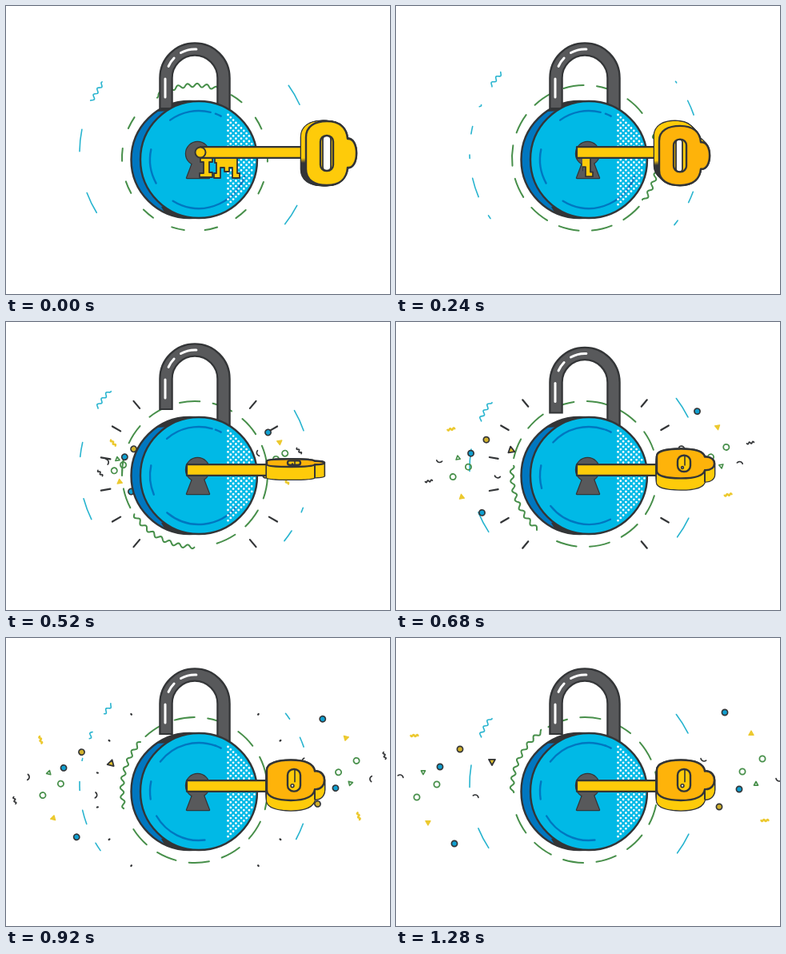
Animation of 480 by 360 pixels, one loop 1.32 s. Source, as an HTML page with a canvas:

```html
<!DOCTYPE html>
<html lang="en">
<head>
<meta charset="utf-8">
<title>Padlock and key</title>
<style>
html, body { margin: 0; width: 100%; height: 100%; overflow: hidden; background: #fff; }
canvas { display: block; width: 480px; height: 360px; }
</style>
</head>
<body>
<canvas id="stage"></canvas>
<script>
const LOOP = 1320, STEP = 40, RAD = Math.PI / 180;
const INK = '#333537', METAL = '#58595b', CYAN = '#00b9e6', BLUE = '#0077c0',
      GOLD = '#fecb0a', GREEN = '#478f4a', SEA = '#28b4cf', WHITE = '#fff';
const canvas = document.getElementById('stage');
const c = canvas.getContext('2d');
const dpr = window.devicePixelRatio || 1;
canvas.width = 480 * dpr;
canvas.height = 360 * dpr;

const ramp = (t, from, to) => Math.min(1, Math.max(0, (t - from) / (to - from)));
const smooth = x => x * x * (3 - 2 * x);
const easeOut = (x, n = 2) => 1 - (1 - x) ** n;

function stroke(color, width, cap = 'round') {
  c.strokeStyle = color;
  c.lineWidth = width;
  c.lineCap = cap;
  c.lineJoin = 'round';
  c.stroke();
}

function fill(color) {
  c.fillStyle = color;
  c.fill();
}

function line(x0, y0, x1, y1) {
  c.beginPath();
  c.moveTo(x0, y0);
  c.lineTo(x1, y1);
}

function arc(x, y, r, from = 0, to = 360) {
  c.beginPath();
  c.arc(x, y, r, from * RAD, to * RAD);
}

function pill(x, y, w, h, r) {
  c.beginPath();
  c.roundRect(x, y, w, h, r);
}

function poly(points) {
  c.beginPath();
  points.forEach(([x, y]) => c.lineTo(x, y));
  c.closePath();
}

function wavyArc(x, y, r, from, to, amp, period) {
  c.beginPath();
  for (let a = from; a <= to; a += 0.4) {
    const d = r + amp * Math.sin(a / period * 2 * Math.PI);
    c.lineTo(x + d * Math.cos(a * RAD), y + d * Math.sin(a * RAD));
  }
}

// Dashes that swing to and fro behind windows of angles.
function outerRing(t) {
  const swing = -3 + 10 * Math.cos((t - 320) / LOOP * 2 * Math.PI);
  const dashes = (from, to, start, draw) => {
    for (let k = -2; k <= 2; k++) {
      const a = start + swing + k * 21.5;
      const lo = Math.max(a, from), hi = Math.min(a + 11, to);
      if (hi - lo < 0.4) continue;
      draw(lo, hi);
      stroke(SEA, 1.6);
    }
  };
  const plain = (a, b) => arc(236, 183, 144, a, b);
  dashes(20, 39, 30, plain);
  dashes(145, 167, 151, plain);
  dashes(177, 193, 183, plain);
  dashes(322, 341, 327, plain);
  dashes(203.5, 224, 209, (a, b) => wavyArc(236, 183, 144, a, b, 2, 3.6));
}

function greenRing(t) {
  const a = 266 + 300 * easeOut(ramp(t, 60, 1280), 2.6);
  const dash = 10 + 6 * ramp(t, 0, 240);
  wavyArc(236, 190, 91, a - 28, a + 28, 2.2, 7.5);
  stroke(GREEN, 2);
  for (let i = 0; i < 11; i++) {
    const s = a + 34 + i * 26.4;
    arc(236, 190, 91, s, s + dash);
    stroke(GREEN, 2);
  }
}

function rays(t) {
  const x = ramp(t, 440, 920);
  if (x === 0 || t > 920) return;
  const r0 = 107 + 16 * x ** 2.4, r1 = 118 + 6 * x;
  for (let a = 10; a < 360; a += 20) {
    const dx = Math.cos(a * RAD), dy = Math.sin(a * RAD);
    if (dx > 0.9 || Math.abs(dx) < 0.6) continue;
    line(236 + r0 * dx, 190 + r0 * dy, 236 + r1 * dx, 190 + r1 * dy);
    stroke(INK, 2.2);
  }
}

function dot(color) {
  arc(0, 0, 3.6);
  fill(color);
  stroke(INK, 1.7);
}

function wave(color, width) {
  c.beginPath();
  for (let x = -4.5; x <= 4.5; x += 0.5) c.lineTo(x, 1.1 * Math.sin(x * 1.4));
  stroke(color, width);
}

function tri(size, edge, width, color) {
  poly([[-size, -size * 0.8], [size, -size * 0.8], [0, size]]);
  if (color) fill(color);
  stroke(edge, width);
}

const shapes = {
  cyan: () => dot('#109fd0'),
  gold: () => dot('#d0b02c'),
  ring() { arc(0, 0, 3.6); stroke(GREEN, 1.8); },
  flag: () => tri(4, INK, 1.8, '#e3c12b'),
  yellow: () => tri(3, '#ecc92f', 1.4, '#ecc92f'),
  green: () => tri(2.6, GREEN, 1.6),
  streak: () => wave('#ecc92f', 2.4),
  worm: () => wave(INK, 1.7),
  hook() { arc(0, 2, 4, 230, 350); stroke(INK, 1.7); }
};

// Resting places on the left; the right side is the same, half a turn round.
const CONFETTI = [
  ['streak', 23, 122], ['cyan', 55, 161], ['cyan', 73, 257], ['gold', 80, 139],
  ['flag', 120, 155], ['green', 34, 168], ['ring', 51, 183], ['ring', 26, 199],
  ['hook', 5, 173], ['hook', 99, 198], ['worm', -13, 206], ['yellow', 40, 231]
];

function confetti(t) {
  if (t < 200) return;
  const out = 0.773 * ramp(t, 150, 680) ** 1.5 + 0.227 * easeOut(ramp(t, 680, 1280), 1.6);
  for (const side of [0, Math.PI]) {
    c.save();
    c.translate(242, 175);
    c.rotate(side);
    for (const [shape, x, y] of CONFETTI) {
      c.save();
      c.translate(-17 + (x - 225) * out, (y - 175) * out);
      c.rotate((1 - out) * 750 * RAD);
      shapes[shape]();
      c.restore();
    }
    c.restore();
  }
}

function shackle(t) {
  const lift = 19 * smooth(ramp(t, 400, 520)) - 11 * smooth(ramp(t, 540, 860));
  const bow = end => {
    c.beginPath();
    c.moveTo(200, end);
    c.lineTo(200, 90);
    c.arc(236, 90, 36, Math.PI, 0);
    c.lineTo(272, 165);
  };
  c.save();
  c.translate(0, -lift);
  bow(129);
  stroke(INK, 17.5, 'butt');
  bow(127);
  stroke(METAL, 13, 'butt');
  line(199, 91, 199, 114);
  stroke(WHITE, 3);
  arc(236, 90, 36, 204, 224);
  stroke(WHITE, 3);
  arc(236, 90, 36, 241, 273);
  stroke(WHITE, 3);
  c.restore();
}

function backDisc() {
  arc(229.5, 192, 73);
  fill(BLUE);
  c.save();
  c.clip();
  poly([[194, 251], [260, 240], [260, 270], [205, 270]]);
  fill(INK);
  poly([[186, 132], [205, 116], [250, 116], [230, 130]]);
  fill(INK);
  c.restore();
  arc(229.5, 192, 73);
  stroke(INK, 2.4);
}

function frontDisc(t) {
  arc(241, 192, 73);
  fill(CYAN);

  const p = smooth(ramp(t, 300, 900));
  const groove = (a, b) => {
    arc(241, 192, 61, a, b);
    stroke(BLUE, 2.4);
  };
  groove(234 - 16 * p, 284 + 6 * p);
  groove(290, 297);
  groove(151 + 20 * p, 192);
  groove(20 + 63 * p, 122 + 28 * p);

  c.beginPath();
  for (let row = 0; row < 36; row++) {
    for (let x = 277.5 + (row % 2) * 3.3; x < 312; x += 6.6) {
      const y = 136 + row * 3.3;
      if (Math.hypot(x - 241, y - 192) > 70) continue;
      c.moveTo(x + 1.4, y);
      c.arc(x, y, 1.4, 0, 7);
    }
  }
  fill(WHITE);
  arc(241, 192, 73);
  stroke(INK, 2.4);
}

function keyhole() {
  const head = () => arc(239.5, 184.5, 14.5);
  const foot = () => poly([[234, 194], [226, 215], [254, 215], [246, 194]]);
  for (const part of [head, foot]) { part(); stroke(INK, 2.4); }
  for (const part of [head, foot]) { part(); fill(METAL); }
}

const TEETH = [
  new Path2D('M0 0H15V5H11V18H15V24H-1V19H4V5H0Z'),
  new Path2D('M18 0H46V19H49V25H40V12H36V17H30V12H25V25H17V19H20V6H18Z')
];

function teeth(tip, y, squash) {
  c.save();
  c.beginPath();
  c.rect(233, 150, 200, 100);
  c.clip();
  c.translate(tip, y);
  c.scale(1, squash);
  c.fillStyle = GOLD;
  c.strokeStyle = INK;
  c.lineWidth = 1.8;
  TEETH.forEach(p => {
    c.fill(p);
    c.stroke(p);
  });
  c.restore();
}

function headPath(x, y, w, e, s) {
  const far = w + (e - w) / 0.75;
  const curve = (...v) => c.bezierCurveTo(...v.map((n, i) => i % 2 ? y + n * s : x + n));
  c.beginPath();
  c.moveTo(x, y - 20 * s);
  curve(0, -34, w * 0.22, -40, w * 0.5, -40);
  curve(w * 0.84, -40, w * 0.98, -30, w, -18);
  curve(far, -20, far, 20, w, 18);
  curve(w * 0.98, 30, w * 0.84, 40, w * 0.5, 40);
  curve(w * 0.22, 40, 0, 34, 0, 20);
  c.closePath();
}

function drawKey(t) {
  // Slide in, wind back a little, turn past the stop, settle.
  const slide = smooth(ramp(t, 0, 240));
  const turn = smooth(ramp(t, 240, 520));
  const angle = (-22 * slide + 105 * turn - 32 * easeOut(ramp(t, 520, 920))) * RAD;
  const s = Math.cos(angle), dx = -6 * (1 - turn), dy = 16 * Math.sin(angle);
  const end = 372 - 46 * slide, tip = end - 129, left = Math.max(tip, 226);
  const x = end + 3 * (1 - turn), y = 184 - dy / 2;
  const w = 52 + 8 * turn, e = 63 + 9 * turn;
  const axis = 183 + 2 * turn;

  if (turn < 0.6) teeth(tip, axis + 7, s);
  c.beginPath();
  c.rect(left, axis - 6.8, end + 2 - left, 13.6);
  fill(GOLD);
  stroke(INK, 2.2);
  if (tip > 232) {
    arc(tip, axis, 6.5);
    fill(GOLD);
    stroke(INK, 2);
  }

  // Extruded side, lit from above, then the face.
  const shade = c.createLinearGradient(0, y + 6, 0, y + 12);
  shade.addColorStop(0, GOLD);
  shade.addColorStop(1, turn < 0.5 ? INK : GOLD);
  const layers = 8;
  for (const paint of [() => stroke(INK, 2.6), () => fill(shade)]) {
    for (let i = layers; i >= 0; i--) {
      headPath(x + dx * i / layers, y + dy * i / layers, w, e, s);
      paint();
    }
  }
  headPath(x, y, w, e, s);
  fill(`rgb(254,${Math.round(203 - 24 * slide)},10)`);
  stroke(INK, 2.4);
  if (turn > 0.7) {
    line(x + w, y + 18 * s, x + w, y + 18 * s + dy);
    stroke(INK, 2);
  }

  const h = 22 * s, hx = x + 26 + 8 * turn, r = Math.min(7.5, h);
  pill(hx - 8, y - h, 16, h * 2, r);
  fill(GOLD);
  c.save();
  c.clip();
  if (turn < 0.5) {
    pill(hx - 5, y - h, 10 - 2 * slide, h * 2, r * 0.7);
    fill(WHITE);
    stroke(INK, 1.8);
  } else {
    line(hx + 1, y - h, hx + 1, y + 2);
    stroke(INK, 1.6);
    arc(hx - 2, y + h * 0.5, 3 * s);
    fill(WHITE);
    stroke(INK, 1.6);
  }
  c.restore();
  pill(hx - 8, y - h, 16, h * 2, r);
  stroke(INK, 2.4);
}

function frame() {
  const t = Math.floor((performance.now() % LOOP) / STEP) * STEP;
  c.setTransform(dpr, 0, 0, dpr, 0, 0);
  c.fillStyle = WHITE;
  c.fillRect(0, 0, 480, 360);
  outerRing(t);
  greenRing(t);
  rays(t);
  confetti(t);
  backDisc();
  shackle(t);
  frontDisc(t);
  keyhole();
  drawKey(t);
  requestAnimationFrame(frame);
}
frame();
</script>
</body>
</html>
```
